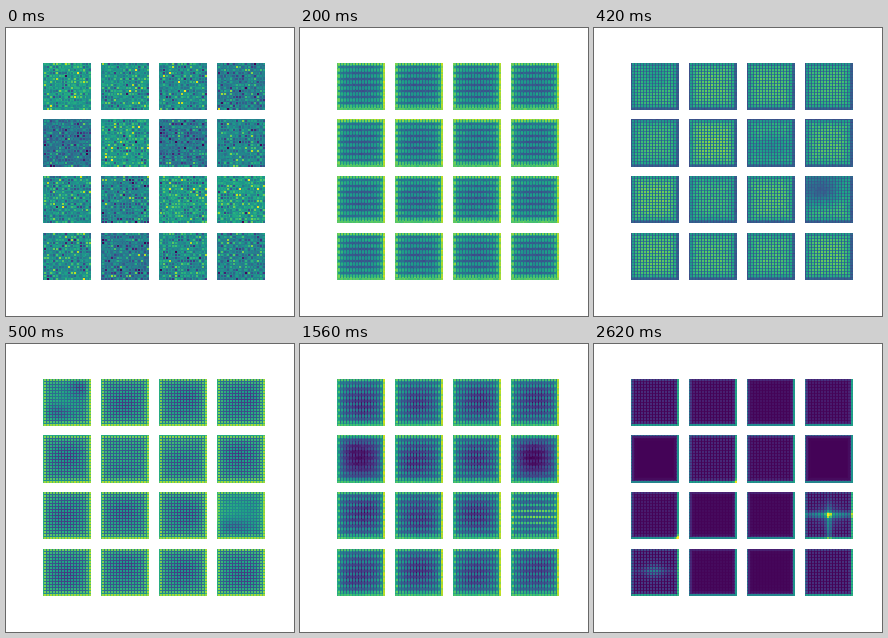
Animation, 288 px wide and 288 px high, one loop 2.9 s. Source, as a matplotlib script:

```python
import numpy as np
import matplotlib.pyplot as plt
from matplotlib.animation import FuncAnimation

N = 32
Y, X = np.mgrid[0:N, 0:N]
ODD_Y, ODD_X = Y % 2, X % 2
BOTH = ODD_Y * ODD_X
DASH = ODD_X * (Y % 4 < 3)
LEFT, RIGHT, TOP, BOTTOM = X, N - 1 - X, Y, N - 1 - Y
EDGE = np.minimum(np.minimum(LEFT, RIGHT), np.minimum(TOP, BOTTOM))
BELL = (np.sin(np.pi * (X + .5) / N) * np.sin(np.pi * (Y + .5) / N)) ** .6
PLATEAU = 1 - np.exp(-EDGE / 2.5)


def blob(y, x, ry, rx):
    return np.exp(-((Y - y) / ry) ** 2 - ((X - x) / rx) ** 2)


def rim(left, right, top, bottom, fall):
    """Glow that fades inward from each side."""
    sides = ((left, LEFT), (right, RIGHT), (top, TOP), (bottom, BOTTOM))
    return np.max([a * np.exp(-d / fall) for a, d in sides], axis=0)


def speckle(k, rng):
    mean = [.56, .53, .50, .43, .40, .55, .41, .48,
            .51, .47, .56, .56, .50, .42, .50, .46][k]
    spread = .03 + .025 * ODD_Y + .02 * ODD_X + .1 * BOTH
    return mean - .02 * ODD_X + spread * rng.normal(size=(N, N))


def stripes(k, rng):
    bright = .46 + .32 * PLATEAU + .08 * (ODD_X - .5)
    dark = .33 - .1 * PLATEAU + .06 * ODD_X
    v = np.where(ODD_Y == 1, bright, dark)
    v = np.where((TOP < 1) | (BOTTOM < 1), .3 + .04 * ODD_X, v)
    v = np.where((LEFT < 1) | (RIGHT < 1), .29 + .1 * ODD_Y, v)
    return v + .02 * rng.normal(size=(N, N))


def dashes(k, rng):
    v = .44 - .17 * BELL + .2 * DASH + .05 * ODD_Y
    v = v - .06 * (Y % 4 == 3)
    v = v + rim(.3, .42, .34, .32, 1.1)
    return np.minimum(v, .88) + .02 * rng.normal(size=(N, N))


def lattice(k, rng):
    light = .74 + .03 * rng.normal()
    if k == 0:
        light = light - .15 * blob(10, 15, 10, 10)
    elif k == 6:
        light = light - .18 * blob(18, 16, 9, 14)
    elif k == 11:
        light = light - .44 * blob(9, 10, 11, 15)
    v = .27 + (light - .27) * (.45 * ODD_X + .18 * ODD_Y + .37 * BOTH)
    v = .28 + (v - .28) * (.4 + .6 * PLATEAU)
    v = np.where(EDGE < 1, .25 + .06 * BOTH, v)
    return v + .015 * rng.normal(size=(N, N))


def dots(k, rng):
    y, x = rng.uniform(10, 22, 2)
    v = .34 - .12 * BELL - .05 * blob(y, x, 7, 9)
    contrast = .36
    if k == 0:
        v = v + .22 * blob(15, 14, 10, 11)
        v = v - .14 * blob(6, 24, 5, 6) - .14 * blob(22, 10, 5, 8)
        contrast = contrast - .15 * blob(15, 14, 12, 12)
    elif k == 5:
        v = v + .08 * blob(16, 13, 9, 11)
    elif k == 6:
        v = v + .1 * blob(8, 11, 8, 11)
    elif k == 11:
        v = v + .28 * blob(13, 15, 11, 18) - .1 * blob(23, 11, 4, 9)
        contrast = contrast - .24 * blob(14, 15, 14, 20)
    v = v + contrast * BOTH
    v = v + rim(.3, .38, .28, .4, 1.2)
    return np.minimum(v, .86) + .01 * rng.normal(size=(N, N))


def weave(k, rng):
    dim = k in (4, 7)
    depth = .32 if dim else .25 + .02 * rng.normal()
    comb = .22 * DASH + .08 * BOTH + .05 * ODD_Y
    if dim:
        comb = comb * (1 - .65 * BELL)
    y, x = rng.uniform(9, 23, 2)
    v = .34 - depth * BELL - .05 * blob(y, x, 8, 9) + comb
    if k == 11:
        v = v + .16 * blob(16, 16, 10, 16)
        v = v + .25 * blob(16, 16, 7, 15) * (Y % 4 == 1)
    v = v + rim(.28, .4, .24, .28, 1)
    return np.clip(v, .02, .9) + .015 * rng.normal(size=(N, N))


def glow(k, rng):
    faint = [.12, .08, .04, .07, 0, .11, .07, 0,
             .07, .02, .02, .15, .16, .02, .01, .13][k]
    v = .01 + faint * (.75 * BOTH + .2 * ODD_X)
    side = rim(.38, .5, .32, .44, .65)
    v = v + side * (.62 + .38 * np.maximum(ODD_X, ODD_Y))
    if k == 5:
        v = v + .35 * blob(31, 31, 1.5, 1.5)
    elif k == 8:
        v = v + .6 * blob(31, 31, 1.7, 1.7)
    elif k == 11:
        cross = .34 * blob(15.5, 16, 2, 25) + .3 * blob(23, 15.5, 14, 2)
        v = v + cross * (.75 + .3 * ODD_X)
        v = v + .12 * blob(16, 16, 8, 10) + .45 * blob(15.5, 15.5, 1.6, 1.6)
    elif k == 12:
        v = v + .2 * blob(15, 15, 5, 6) * (.5 + .6 * BOTH)
        v = v + .08 * blob(15, 15, 2, 16)
    return v


STAGES = [speckle, stripes, dashes, lattice, dots, weave, glow]
HOLDS = [1, 1, 1, 2, 1, 16, 7]  # in steps of 100 ms
ORDER = np.repeat(np.arange(len(STAGES)), HOLDS)
TILES = [[np.clip(make(k, np.random.default_rng(100 * s + k)), 0, 1)
          for k in range(16)] for s, make in enumerate(STAGES)]

fig, axes = plt.subplots(4, 4, figsize=(4, 4), dpi=72)
fig.patch.set_facecolor("white")
fig.subplots_adjust(left=.125, right=.9, bottom=.125, top=.88,
                    wspace=.2, hspace=.2)
images = []
for ax, tile in zip(axes.flat, TILES[0]):
    ax.axis("off")
    images.append(ax.imshow(tile, cmap="viridis", vmin=0, vmax=1,
                            interpolation="nearest"))


def update(i):
    for image, tile in zip(images, TILES[ORDER[i]]):
        image.set_data(tile)
    return images


anim = FuncAnimation(fig, update, frames=len(ORDER), interval=100,
                     repeat=True, repeat_delay=0, blit=False)
plt.show()
```
